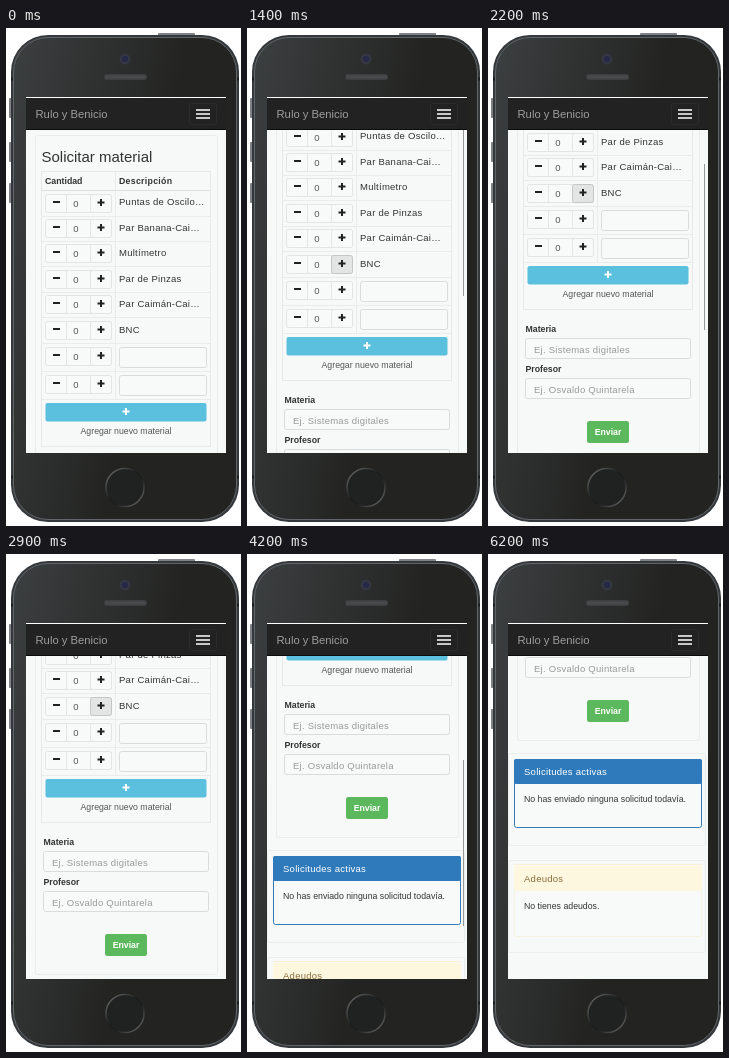
These frames come from a looping animation (235 by 498 pixels, 8 s). An HTML page:

```html
<!DOCTYPE html>
<html lang="es">
<head>
<meta charset="utf-8">
<title>Solicitar material</title>
<style>
  html, body { margin: 0; width: 100%; height: 100%; overflow: hidden; background: #fff; }
  svg { display: block; width: 235px; height: 498px; }
  text { font-family: "Liberation Sans", Arial, sans-serif; font-size: 8.75px; fill: #333; }
  .b { font-weight: bold; }
  .m, .ph { font-size: 9.5px; letter-spacing: .26px; }
  .ph { fill: #999; }
  .w { fill: #fff; }
  .mid { text-anchor: middle; }
</style>
</head>
<body>
<svg viewBox="0 0 235 498">
  <defs>
    <clipPath id="view"><rect x="20" y="69" width="200" height="356"/></clipPath>
    <linearGradient id="gloss" x1="0" y1=".1" x2=".65" y2=".35">
      <stop offset="0" stop-color="#3b3e3f"/>
      <stop offset="1" stop-color="#232422"/>
    </linearGradient>
    <linearGradient id="ring" x2="1" y2="1">
      <stop offset="0" stop-color="#777"/>
      <stop offset=".45" stop-color="#1b1c1c"/>
      <stop offset=".6" stop-color="#1b1c1c"/>
      <stop offset="1" stop-color="#777"/>
    </linearGradient>
  </defs>

  <!-- phone -->
  <g fill="#7f8286">
    <rect x="3" y="70" width="4" height="20" rx="1"/>
    <rect x="3" y="114" width="4" height="20" rx="1"/>
    <rect x="3" y="155" width="4" height="20" rx="1"/>
    <rect x="152" y="5" width="37" height="4" rx="1"/>
  </g>
  <rect x="5" y="7" width="228" height="487" rx="37" fill="#34383b"/>
  <path d="M5 51h3M230 51h3M5 449h3M230 449h3" stroke="#1c1d1d" stroke-width="3"/>
  <rect x="7.5" y="9.5" width="223" height="482" rx="34.5" fill="url(#gloss)" stroke="#62666a"/>
  <circle cx="119" cy="31" r="5.5" fill="#343641"/>
  <circle cx="119" cy="31" r="3" fill="#252847"/>
  <rect x="98" y="46" width="43" height="6" rx="3" fill="#3d3f40"/>
  <rect x="99" y="47.5" width="41" height="3" rx="1.5" fill="#484a4b"/>
  <circle cx="119" cy="459.5" r="19" fill="#202221" stroke="url(#ring)" stroke-width="1.5"/>

  <g clip-path="url(#view)">
    <rect x="20" y="69" width="200" height="356" fill="#f6f9f7"/>
    <g id="page"></g>
    <rect x="20" y="69" width="200" height="1" fill="#fff"/>
    <rect x="20" y="70" width="200" height="32" fill="#222"/>
    <rect x="20" y="101" width="200" height="1" fill="#0b0b0b"/>
    <text x="29.5" y="90" style="font-size:11.25px;fill:#9d9d9d">Rulo y Benicio</text>
    <rect x="183.5" y="75.5" width="27" height="21" rx="2.5" fill="none" stroke="#2b2b2b"/>
    <path d="M190 82h14M190 86h14M190 90h14" stroke="#fff" stroke-width="1.4"/>
    <rect id="bar" x="216" width="1" height="166" fill="#969897"/>
  </g>
</svg>
<script>
const NS = 'http://www.w3.org/2000/svg';
const page = document.getElementById('page');
const bar = document.getElementById('bar');

function add(tag, attrs, content) {
  const el = document.createElementNS(NS, tag);
  for (const k in attrs) el.setAttribute(k, attrs[k]);
  if (content) el.textContent = content;
  return page.appendChild(el);
}
const box = (x, y, w, h, stroke, fill = 'none', rx = 2) =>
  add('rect', { x: x + .5, y: y + .5, width: w - 1, height: h - 1, rx, fill, stroke });
const label = (x, y, str, cls = '') => add('text', { x, y, class: cls }, str);
const line = (y, stroke = '#e9ecea') => add('path', { d: `M36 ${y + .5}H204`, stroke });
const sign = (x, y, plus, stroke = '#222') =>
  add('path', { d: `M${x - 3.5} ${y}h7` + (plus ? `M${x} ${y - 3.5}v7` : ''), stroke, 'stroke-width': 2 });

const FILL = '#f7faf8', EDGE = '#e2e5e3';

function counter(y) {
  box(39, y, 67, 19, EDGE, FILL);
  const plus = box(84, y, 22, 19, EDGE, FILL);
  add('path', { d: `M60.5 ${y}v19`, stroke: EDGE });
  sign(50.5, y + 8, false);
  const zero = label(70, y + 13, '0', 'mid');
  zero.style.fontSize = '9.5px';
  zero.style.fill = '#555';
  sign(95, y + 8.5, true);
  return plus;
}
function field(x, y, w, hint) {
  box(x, y, w, 21, '#d9dcda', FILL);
  if (hint) label(x + 9, y + 14.5, hint, 'ph');
}
function panel(y, h, color, head, title, titleFill, body) {
  box(20, y - 6, 198, 93, '#eaedeb');
  box(26, y, 188, h, color, '#f8faf9');
  add('rect', { x: 26, y, width: 188, height: 25, rx: 2, fill: head });
  label(36, y + 16, title, 'm').style.fill = titleFill;
  label(36, y + 43, body);
}

// request form
box(29, 107, 183, 464, '#eaedeb', '#f6f9f7');
label(35.5, 134, 'Solicitar material').style.fontSize = '15px';
box(35, 143, 170, 276, '#e6e9e7', '#f7f9f8', 0);
add('path', { d: 'M109.5 143V371', stroke: '#e9ecea' });
label(39, 156, 'Cantidad', 'b');
label(113, 156, 'Descripción', 'b').style.letterSpacing = '.3px';
line(162, '#dde0de');

const items = ['Puntas de Oscilo…', 'Par Banana-Cai…', 'Multímetro',
  'Par de Pinzas', 'Par Caimán-Cai…', 'BNC'];
let pressed;
items.forEach((name, i) => {
  const top = Math.round(162.6 + i * 25.4);
  pressed = counter(top + 3);
  label(113, Math.round(177.4 + i * 25.5), name, 'm');
  line(top + 25);
});
[319, 347].forEach(y => {
  counter(y);
  field(113, y, 88);
  line(y + 24);
});
add('rect', { x: 39.5, y: 375, width: 161, height: 18.5, rx: 2, fill: '#5bc0de' });
sign(120, 383.5, true, '#fff');
label(120, 406, 'Agregar nuevo material', 'mid').style.fill = '#555';

label(37.5, 440.5, 'Materia', 'b');
field(37, 447, 166, 'Ej. Sistemas digitales');
label(37.5, 480.5, 'Profesor', 'b');
field(37, 487, 166, 'Ej. Osvaldo Quintarela');
add('rect', { x: 99, y: 530, width: 42, height: 22, rx: 2.5, fill: '#5cb85c' });
label(120, 544, 'Enviar', 'b w mid');

panel(589, 69, '#337ab7', '#2f7aba', 'Solicitudes activas', '#fff',
  'No has enviado ninguna solicitud todavía.');
panel(696, 71, '#f6f3e4', '#fdf7e0', 'Adeudos', '#8a6d3b', 'No tienes adeudos.');
add('path', { d: 'M26 694.5H214', stroke: '#fbf0d3' });

// Each swipe: start time, scroll positions every 100 ms, fade start, fade steps
const swipes = [
  [500, [1, 5, 12, 19, 27, 34, 41, 47, 53, 66, 74, 83, 92, 101, 110, 119, 128, 137, 144, 150], 2800, 2],
  [3600, [172, 208, 236, 256, 270, 280, 287, 291], 4700, 2],
  [5300, [294, 330, 362, 384], 6000, 3]
];

function draw() {
  const t = performance.now() % 8000;
  let y = 0, alpha = 0;
  for (const [start, path, fade, steps] of swipes) {
    if (t < start) break;
    y = path[Math.min(path.length - 1, Math.floor((t - start) / 100))];
    alpha = t < fade ? 1 : Math.max(0, 1 - (Math.floor((t - fade) / 100) + 1) / steps);
  }
  page.setAttribute('transform', `translate(0 ${-y})`);
  bar.setAttribute('y', Math.round(71.5 + y * .468));
  bar.setAttribute('opacity', alpha);
  pressed.setAttribute('fill', t >= 500 ? '#e3e5e4' : FILL);
  pressed.setAttribute('stroke', t >= 500 ? '#c4c7c5' : EDGE);
  requestAnimationFrame(draw);
}
draw();
</script>
</body>
</html>
```
